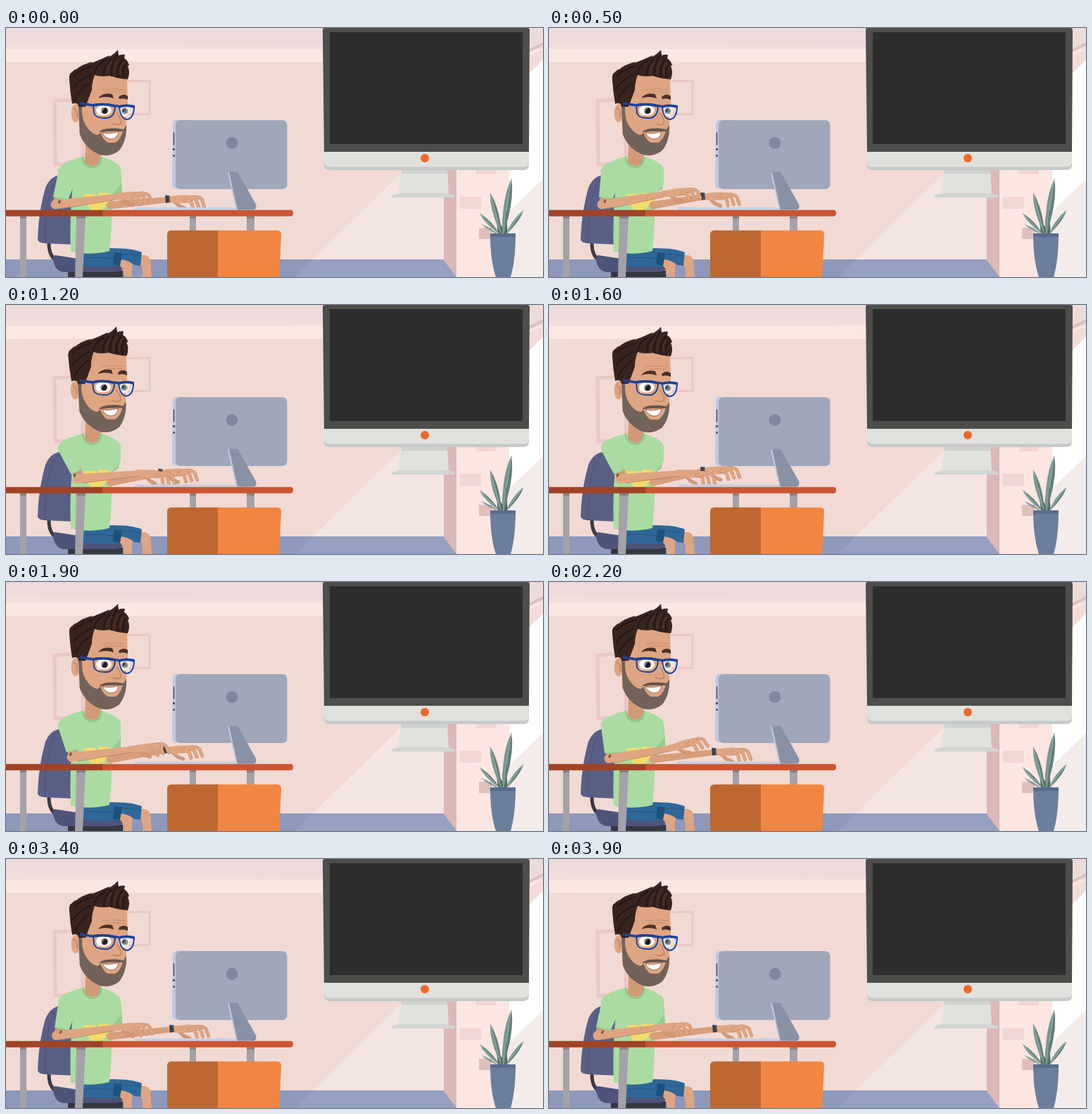
An HTML page for the animation above (4 s loop, 763 by 354 pixels).

```html
<!DOCTYPE html>
<html lang="en">
<head>
<meta charset="utf-8">
<title>Typing at the desk</title>
<style>
html, body { margin: 0; width: 100%; height: 100%; overflow: hidden; background: #f1dad4; }
svg { display: block; width: 763px; height: 354px; }
</style>
</head>
<body>
<svg viewBox="0 0 763 354" xmlns="http://www.w3.org/2000/svg">
  <defs>
    <g id="hand" stroke-linecap="round" stroke-linejoin="round" fill="none">
      <path d="M8 2L16 9L24 12" stroke="#b97f5f" stroke-width="4.800"/>
      <path d="M8 2L16 9L24 12" stroke="#d49a77" stroke-width="3.800"/>
      <path d="M-5 -4.500C8 -5 18 -8 28 -7C36 -5 36 1 30 3C20 5 6 5 -5 4Z" fill="#dfa582"/>
      <g id="fingers">
        <path d="M28 -4Q42 -7 47 -2L51 8M27 -2Q36 -4 40 1L43 9M24 0Q31 0 33 4L35 11" stroke="#b97f5f" stroke-width="4.600"/>
        <path d="M28 -4Q42 -7 47 -2L51 8M27 -2Q36 -4 40 1L43 9M24 0Q31 0 33 4L35 11" stroke="#dfa582" stroke-width="3.800"/>
      </g>
    </g>
  </defs>

  <!-- room -->
  <rect width="763" height="354" fill="#f1dad4"/>
  <rect width="763" height="31" fill="#f2dedb"/>
  <path d="M0 0H763V28L450 26L0 20Z" fill="#eddadb"/>
  <rect y="30" width="763" height="18" fill="#fce8e3"/>
  <rect y="329" width="763" height="25" fill="#8d98bb"/>
  <path d="M566 202H640V329H436Z" fill="#f8f2f2" opacity=".5"/>
  <path d="M436 329H640V354H411Z" fill="#fff" opacity=".08"/>
  <g fill="none" stroke="#e9c8c6">
    <path d="M69 104L109 101V192L70 194Z" stroke-width="5"/>
    <path d="M148 76L204 75V122L148 124Z" stroke-width="3"/>
  </g>
  <path d="M743 48H763V354H715V200H743Z" fill="#f4ebeb"/>
  <path d="M763 45L740 68V200H715V261L763 215Z" fill="#fff"/>
  <path d="M742 66V40L763 30V45Z" fill="#f3dcd8"/>
  <path d="M740 34L764 22" stroke="#dcbec1" stroke-width="4"/>
  <path d="M622 200H641V354H640L622 330Z" fill="#dcb7b8"/>
  <path d="M640 200H715V354H640Z" fill="#fbe6e1"/>
  <path d="M668 200h28v8h-28zM645 240h30v17h-30z" fill="#f1d6d4"/>
  <path d="M672 284h18v16h-18z" fill="#dfc0bc"/>

  <!-- wall display -->
  <path d="M562 200H627L629 237H557Z" fill="#e1e2de"/>
  <path d="M562 202H627V207H562Z" fill="#cfd1ce"/>
  <path d="M557 235H629L638 238V241H548V238Z" fill="#d3d5d2"/>
  <path d="M453 0H741Q744 0 744 3L743 178H452L450 3Q450 0 453 0Z" fill="#4d4d4b"/>
  <path d="M460 6H734V165H460Z" fill="#2d2d2d"/>
  <path d="M452 176H743V194Q743 202 735 202H460Q452 202 452 194Z" fill="#c5c9ca"/>
  <path d="M452 176H743V190Q743 197.500 735 197.500H460Q452 197.500 452 190Z" fill="#e0e1dd"/>
  <circle cx="595" cy="185" r="6" fill="#f0682b"/>

  <!-- plant -->
  <g id="plant"></g>
  <path d="M688 293H724Q724 330 717 354H696Q688 330 688 293Z" fill="#6a7f9d"/>
  <path d="M688 292H724V297H688Z" fill="#586c8c"/>

  <!-- chair and legs -->
  <path d="M61 306Q61 328 76 332" fill="none" stroke="#3a3a40" stroke-width="5"/>
  <path d="M76 209Q63 211 56 227Q46 262 45 301Q46 305 54 306L98 308V209Z" fill="#5a5f85"/>
  <path d="M78 211Q66 217 61 240Q55 270 56 306" fill="none" stroke="#4d5278"/>
  <path d="M88 345H166V354H88Z" fill="#353741"/>
  <path d="M70 323Q66 323 67 330Q70 346 82 347H155Q167 346 168 338Z" fill="#4d5379"/>
  <path d="M160 328L181 330Q178 342 179 354H168Q168 342 160 336ZM191 323Q203 321 205 330L207 354H194Q195 342 190 333Z" fill="#dfa582"/>
  <path d="M110 317L150 313Q180 313 193 319L191 338L182 337Q176 331 164 329L161 338Q140 342 110 338Z" fill="#2f6798"/>
  <path d="M154 319L165 320L162 338L152 336Z" fill="#1f5079"/>
  <path d="M112 327Q134 325 153 328M166 322Q180 320 192 324" stroke="#245781" fill="none"/>

  <!-- body -->
  <path id="farSleeve" fill="#96cc90"/>
  <path d="M113 160L112 192Q124 200 135 192V172Z" fill="#d39a78"/>
  <path d="M109 183Q92 187 82 193Q72 199 78 212L95 222Q90 270 92 318Q120 324 147 317Q151 280 150 238L163 222V201Q160 190 135 183Q134 198 122 197Q111 196 109 183Z" fill="#aadca1"/>
  <path d="M109 183Q111 197 122 197.500Q134 198 135 183" fill="none" stroke="#8fc78a" stroke-width="3"/>
  <path d="M110 236H127L129 240L132 234L148 235L149 246L136 258L122 261L112 246Z" fill="#f3dc6b"/>
  <path id="farArm" fill="#d89e7b"/>
  <g id="farHand"><use href="#hand"/><path d="M-5 -6L1 -6L2 4L-4 5Z" fill="#383d49"/><path d="M-3 -5.500H0V4" fill="none" stroke="#566276"/></g>
  <path id="upper" stroke="#d39a78" stroke-width="14" stroke-linecap="round"/>
  <path id="nearArm" fill="#dfa582"/>
  <path id="nearLine" fill="none" stroke="#b97f5f" stroke-width=".9"/>
  <g id="nearHand"><use href="#hand"/></g>
  <path id="sleeve" fill="#aadca1"/>
  <path id="hem" fill="none" stroke="#8fc78a" stroke-width="1.200"/>
  <path id="cuffShade" fill="none" stroke="#80553f" stroke-width="3" stroke-linecap="round"/>

  <!-- head -->
  <g id="head">
    <ellipse cx="99" cy="121" rx="6.500" ry="13" fill="#dfa582"/>
    <path d="M96 114Q102 116 101 127" fill="none" stroke="#bd8263" stroke-width="1.500"/>
    <path d="M121 68Q150 66 172 72L173 108Q169 118 171 136Q172 158 160 174Q148 184 132 180Q112 170 104 150L103 108Z" fill="#dfa582"/>
    <path d="M103 111H108Q107 128 113 138Q121 151 130 152Q134 150 135 146Q150 140 167 144L171 138Q172 160 161 174Q149 184 133 180Q112 171 105 151Z" fill="#71625a"/>
    <path d="M134 148Q150 145 166 147Q160 165 149 164Q139 163 134 148Z" fill="#dfa582"/>
    <path d="M133 147Q141 142 151 143Q162 142 167 147Q152 146 133 148Z" fill="#65564f"/>
    <path d="M137 149Q148 151 160 147.500Q158 158 149 158Q141 157 137 149Z" fill="#fff" stroke="#8d4d3f" stroke-width=".8"/>
    <path d="M145 163H155L153 168H147Z" fill="#71625a"/>
    <path d="M94 108Q91 91 90 74Q89 69 91 65L99 58L98 60Q109 51 123 48L121 50Q134 45 147 39L146 41Q153 38 159 31L160 39Q165 37 169 38L168 43Q173 46 175 53L173 54Q177 62 173 73Q158 72 148 68Q134 70 126 67Q122 77 122 88L113 112H103Q102 105 94 108Z" fill="#38241f"/>
    <path d="M96 68Q107 58 124 54M126 66Q126 54 141 46M139 68Q138 55 149 44M150 69Q148 52 158 38M159 70Q156 56 166 44M167 71Q164 60 170 52M95 86Q103 74 121 66M98 102Q104 88 119 78" fill="none" stroke="#251713" stroke-width="2"/>
    <path d="M144 66Q143 56 151 48M154 67Q153 54 160 45M163 66Q161 56 167 49" fill="none" stroke="#4c332a" stroke-width="2"/>
    <path d="M137 88Q152 85 169 88M140 92Q152 89 168 92" fill="none" stroke="#c48a69" stroke-width=".9"/>
    <path id="brows" d="M131 100Q137 91 151 94L153 100Q141 96 131 100ZM160 98Q167 92 173 97L173 102Q167 99 161 101Z" fill="#49312a"/>
    <path d="M158 121Q165 132 163 136Q159 139 151 136" fill="none" stroke="#b97f5f" stroke-width="1.300"/>
    <ellipse cx="139" cy="117" rx="11" ry="7.500" fill="#fff"/>
    <ellipse cx="168" cy="118.500" rx="7.500" ry="7.500" fill="#f3f1ee"/>
    <circle cx="140" cy="117.500" r="4.800" fill="#4b3529"/><circle cx="140" cy="117.500" r="3.200" fill="#201815"/>
    <circle cx="169" cy="118" r="4.500" fill="#6f7874"/><circle cx="169" cy="118" r="2.800" fill="#29302f"/>
    <path d="M127 124L138 109H144L131 127ZM163 126L172 111H178L167 129Z" fill="#fff" opacity=".35"/>
    <g fill="none" stroke="#1b429b" stroke-width="2" stroke-linejoin="round">
      <path d="M124 109Q139 106 155 110Q155 126 144 128Q128 129 125 121Z"/>
      <path d="M161 111Q171 108 182 111Q182 128 172 130Q162 129 161 111Z"/>
      <path d="M105 107L124 110Q139 107 155 111Q158 110 161 112Q171 109 182 112" stroke-width="3.400"/>
    </g>
  </g>

  <!-- desk -->
  <path d="M184 255H316L330 256V258.500H182Z" fill="#c5d0e5"/>
  <path d="M20 266h9v88h-9z M100 266h13L109 354H98z M261 266h9v22h-9z M342 266h11v22h-11z" fill="#a4a2a7"/>
  <path d="M20 267h9v4h-9z M100 267h13v4h-13z M261 267h9v4h-9z M342 267h11v4h-11z" fill="#85848b"/>
  <g transform="translate(0 .7)">
    <path d="M237 354H229V293Q229 287 235 287H302V354Z" fill="#be6831"/>
    <path d="M301 287H385Q391 287 391 293L388 354H301Z" fill="#f18642"/>
    <path d="M136 258H404Q408 258 408 262Q408 267 404 267H136Z" fill="#ca5533"/>
    <path d="M0 258H137V267H0Z" fill="#a04326"/>
  </g>

  <!-- desktop computer -->
  <g transform="translate(0 .4)">
    <path d="M243 130H260V228H243Q236 228 236 221L237 137Q237 130 243 130Z" fill="#bdcae5"/>
    <path d="M248 130.500H392Q399.500 130.500 399.500 138V221Q399.500 228.500 392 228.500H248Q241 228.500 241 221V138Q241 130.500 248 130.500Z" fill="#a0a7b9"/>
    <path d="M238.500 148V166" stroke="#454c63" stroke-width="1.500"/>
    <g fill="#454c63"><circle cx="238.500" cy="172" r="1.700"/><circle cx="238.500" cy="181" r="1.500"/></g>
    <circle cx="321" cy="163" r="8.500" fill="#7f889f"/>
    <path d="M315 205H319L331 258H327Z" fill="#bdcae5"/>
    <path d="M317 204H329L355 250Q357 258 351 258H329Z" fill="#8991a5"/>
  </g>
</svg>
<script>
const LOOP = 4000, STEP = 100;
const $ = id => document.getElementById(id);
const put = (id, d) => $(id).setAttribute('d', d);
const move = (id, x, y, a) => $(id).setAttribute('transform', `translate(${x} ${y}) rotate(${a})`);

// time, sleeve x y, elbow x y, near wrist x y angle, far wrist x y angle, far cuff x y, head tilt
const poses = [
  [0,    67, 240,  70, 251, 156, 240,  0, 231, 244, 2, 165, 234, 0],
  [500,  71, 240,  75, 251, 164, 236, -3, 220, 240, 2, 161, 229, 0],
  [1200, 92, 240, 101, 247, 190, 239,  8, 221, 239, 2, 160, 232, 1],
  [1600, 92, 240, 101, 247, 186, 239,  7, 220, 236, 1, 160, 232, 0],
  [2200, 79, 243,  85, 251, 174, 236, -12, 236, 242, 2, 166, 240, 0],
  [2800, 72, 240,  75, 251, 162, 239,  2, 237, 242, 2, 167, 243, 0],
  [3900, 67, 239,  69, 251, 153, 240,  0, 237, 242, 2, 165, 236, 0]
];
poses.push([LOOP, ...poses[0].slice(1)]);

function poseAt(t) {
  const i = poses.findIndex(p => p[0] > t);
  const a = poses[i - 1], b = poses[i];
  const u = (t - a[0]) / (b[0] - a[0]), k = u * u * (3 - 2 * u);
  return a.slice(1).map((v, j) => v + (b[j + 1] - v) * k);
}

// tapered limb with a round start
function limb(x1, y1, r1, x2, y2, r2) {
  const n = Math.hypot(x2 - x1, y2 - y1), nx = (y1 - y2) / n, ny = (x2 - x1) / n;
  const at = (x, y, r) => `${x + nx * r} ${y + ny * r}`;
  return `M${at(x1, y1, -r1)}L${at(x2, y2, -r2)}L${at(x2, y2, r2)}L${at(x1, y1, r1)}A${r1} ${r1} 0 0 1 ${at(x1, y1, -r1)}Z`;
}

function draw(t) {
  const [sx, sy, ex, ey, nx, ny, na, fx, fy, fa, cx, cy, tilt] = poseAt(t);
  const swing = sx - 67, hx = sx + 21 - swing * .28, hy = sy + 4 - swing * .4;
  const mx = (sx + hx) / 2, my = (sy + hy) / 2;
  const hem = `${sx} ${sy}Q${mx} ${my + 2} ${hx} ${hy}`;
  put('sleeve', `M104 187L82 193Q72 199 74 206L${hem}L101 214Z`);
  put('hem', `M${hem}`);
  put('cuffShade', `M${mx - 1} ${my + 4}L${mx - 2} ${my + 6}`);
  put('farSleeve', `M140 190Q160 190 163 201L${cx} ${cy}L148 ${cy + 8}Z`);
  put('farArm', limb(148, 252, 5.5, fx, fy, 4));
  put('upper', `M${mx} ${my - 4}L${ex + 3} ${ey - 2}`);
  put('nearArm', limb(ex, ey, 6.5, nx, ny, 4));
  put('nearLine', `M${ex + 8} ${ey + 6}L${nx} ${ny + 4.2}`);
  move('farHand', fx, fy, fa);
  move('nearHand', nx, ny, na);
  const tap = Math.sin(t / LOOP * Math.PI * 20);
  $('fingers').setAttribute('transform', `rotate(${tap * 1.5} 26 0)`);
  $('head').setAttribute('transform', `rotate(${-.75 * tilt} 125 182)`);
  $('brows').setAttribute('transform', `translate(0 ${-1.5 * tilt})`);
}

// leaf from its root to its tip, widest past the middle
const leaf = (x, tx, ty, w) => {
  const mx = x + (tx - x) * .6, my = 294 + (ty - 294) * .6;
  const side = s => `M${x} 294Q${mx - s * w} ${my} ${tx} ${ty}L${x} 294Z`;
  return `<path d="${side(1)}" fill="#78978f"/><path d="${side(-1)}" fill="#617f7c"/>` +
    `<path d="M${x} 294L${tx} ${ty}" stroke="#a9beb4" stroke-width=".6"/>`;
};
$('plant').innerHTML = '<path d="M699 294L697 272L706 284L711 268L713 294Z" fill="#4f6a69"/>' +
  leaf(706, 718, 214, 10) + leaf(704, 688, 234, 8) + leaf(702, 673, 263, 7) +
  leaf(710, 735, 259, 7) + leaf(700, 676, 279, 5) + leaf(707, 710, 256, 7);

function frame(now) {
  draw(Math.floor(now % LOOP / STEP) * STEP);
  requestAnimationFrame(frame);
}
draw(0);
requestAnimationFrame(frame);
</script>
</body>
</html>
```
